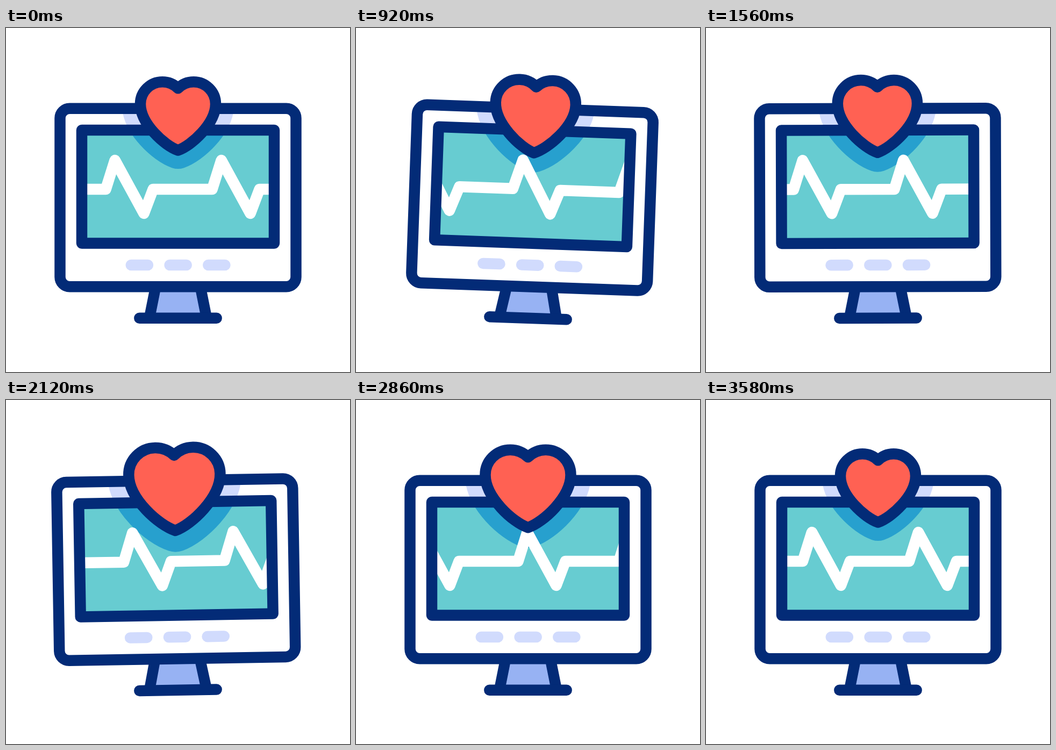
Write an HTML page with a canvas that moves like this. It is 640 by 640 pixels and loops after 3.6 s.

```html
<!DOCTYPE html>
<html lang="en">
<head>
<meta charset="utf-8">
<title>Heart monitor</title>
<style>
  html, body { margin: 0; width: 100%; height: 100%; overflow: hidden; background: #fff; }
  canvas { display: block; width: 640px; height: 640px; }
</style>
</head>
<body>
<canvas id="stage" width="640" height="640"></canvas>
<script>
const ctx = document.getElementById('stage').getContext('2d');
const LOOP = 3600;
const NAVY = '#032b77', RED = '#ff6153', TEAL = '#67ccd1', BLUE = '#27a0ce',
      LAVENDER = '#d1dbfd', PERIWINKLE = '#97b2f3', WHITE = '#fff';

// [time, value] keys
const TILT = [[0, 0], [720, 4], [1298, -3], [1780, 2], [2150, -1], [2400, 0]];
const BEAT = [[0, 1], [420, 1.3], [840, 1.04], [1260, 1.3], [1680, 1]];
const BEAT_PERIOD = 1848;
const WAVE_SPEED = 0.1061;
const WAVE_PEAKS = [-183, 15, 202.5, 400.5];
const HEART_Y = 156;

function ease(keys, t) {
  for (let i = 1; i < keys.length; i++) {
    const [t0, a] = keys[i - 1], [t1, b] = keys[i];
    if (t < t1) {
      const x = (t - t0) / (t1 - t0);
      return a + (b - a) * x * x * (3 - 2 * x);
    }
  }
  return keys[keys.length - 1][1];
}

function stroke(path, color, width) {
  ctx.strokeStyle = color;
  ctx.lineWidth = width;
  ctx.stroke(path);
}

function fill(path, color) {
  ctx.fillStyle = color;
  ctx.fill(path);
}

function clipped(region, draw) {
  ctx.save();
  ctx.clip(region);
  draw();
  ctx.restore();
}

function polyline(...points) {
  const path = new Path2D();
  points.forEach(([x, y]) => path.lineTo(x, y));
  return path;
}

function roundRect(x, y, w, h, r) {
  const path = new Path2D();
  path.roundRect(x, y, w, h, r);
  return path;
}

const caseBody = roundRect(100.5, 149.7, 439, 331.6, 18);
const screen = roundRect(141, 190, 358, 210.5, 0);
const stand = polyline([276.7, 490], [268.5, 530], [268, 540], [372, 540], [371.5, 530], [363.3, 490]);
const standLegs = [polyline([276.7, 490], [267.7, 535]), polyline([363.3, 490], [372.3, 535])];
const base = polyline([248.3, 539.7], [391.7, 539.7]);
const pills = [222.5, 294.3, 366].map(x => roundRect(x, 430.7, 51.7, 20.6, 10.3));

function heartPath(s) {
  const X = x => 320 + x * s, Y = y => HEART_Y + (y - HEART_Y) * s;
  const path = new Path2D();
  path.moveTo(X(0), Y(227.5));
  path.bezierCurveTo(X(-25), Y(219), X(-70), Y(178), X(-70), Y(141.3));
  path.arc(X(-29), Y(141.3), 41 * s, Math.PI, Math.PI * 1.75);
  path.arc(X(29), Y(141.3), 41 * s, Math.PI * 1.25, Math.PI * 2);
  path.bezierCurveTo(X(70), Y(178), X(25), Y(219), X(0), Y(227.5));
  path.closePath();
  return path;
}

function wavePath(shift) {
  const points = [[-600, 300]];
  for (const peak of WAVE_PEAKS) {
    const x = peak + shift;
    points.push([x - 17, 300], [x, 246], [x + 54, 345], [x + 71, 300]);
  }
  points.push([1100, 300]);
  return polyline(...points);
}

function draw(t) {
  const pulse = ease(BEAT, t % BEAT_PERIOD);
  const shadowScale = 1 + 0.9 * (pulse - 1);
  const heart = heartPath(pulse);
  const shadow = heartPath(shadowScale);
  const drawShadow = color => {
    fill(shadow, color);
    stroke(shadow, color, 69 * shadowScale);
  };

  ctx.setTransform(1, 0, 0, 1, 0, 0);
  ctx.fillStyle = WHITE;
  ctx.fillRect(0, 0, 640, 640);
  ctx.lineCap = ctx.lineJoin = 'round';
  ctx.translate(320, 540);
  ctx.rotate(ease(TILT, t) * Math.PI / 180);
  ctx.translate(-320, -540);

  fill(stand, PERIWINKLE);
  standLegs.forEach(leg => stroke(leg, NAVY, 20.2));
  stroke(base, NAVY, 20.5);

  fill(caseBody, WHITE);
  clipped(caseBody, () => drawShadow(LAVENDER));
  stroke(caseBody, NAVY, 20.5);
  pills.forEach(pill => fill(pill, LAVENDER));

  fill(screen, TEAL);
  clipped(screen, () => {
    drawShadow(BLUE);
    stroke(wavePath(t * WAVE_SPEED), WHITE, 20.5);
  });
  stroke(screen, NAVY, 20.5);

  fill(heart, RED);
  stroke(heart, NAVY, 20.5);
}

const start = performance.now();
function tick() {
  draw((performance.now() - start) % LOOP);
  requestAnimationFrame(tick);
}
draw(0);
requestAnimationFrame(tick);
</script>
</body>
</html>
```
